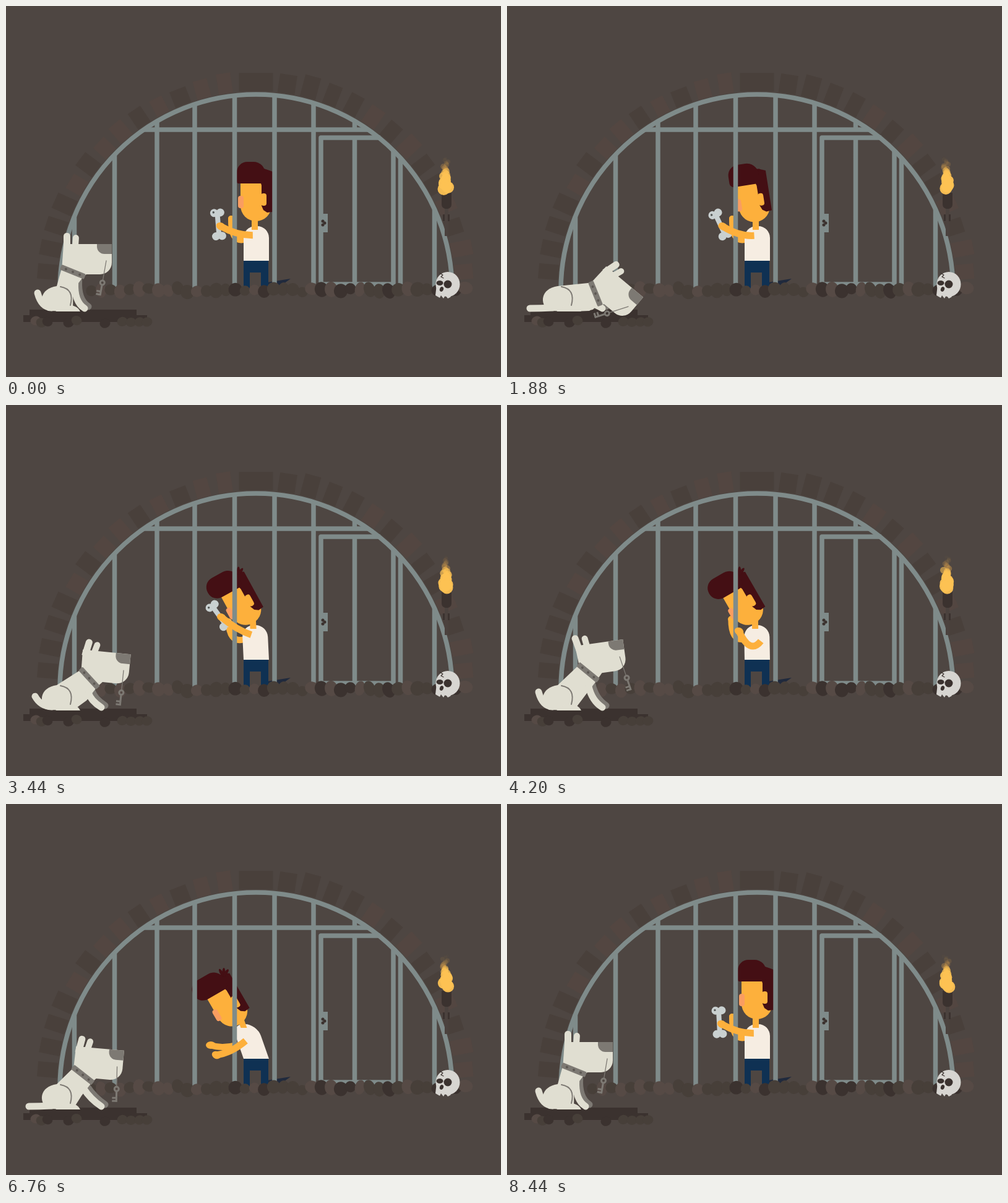
Recreate the animation shown at these times as an HTML page with a canvas. Size 800 by 600 pixels, loop 8.48 s.

```html
<!DOCTYPE html>
<html>
<head>
<meta charset="utf-8">
<title>Prisoner and guard dog</title>
<style>
html, body { margin: 0; width: 100%; height: 100%; overflow: hidden; background: #4e4642; }
canvas { display: block; }
</style>
</head>
<body>
<canvas id="stage" width="800" height="600"></canvas>
<script>
const c = document.getElementById('stage').getContext('2d');
const LOOP = 8480, RAD = Math.PI / 180, TURN = 2 * Math.PI;
const BG = '#4e4642', STEEL = '#7f8b8a', DARK = '#3b322f', MID = '#473f39', LIGHT = '#564a45';
const SKIN = '#fdb03c', HAIR = '#440f14', SHIRT = '#f6ede2', NAVY = '#0f3153';
const FUR = '#e0ded1', GREY = '#7d7973', BONE = '#c9d0d0';

// ---- drawing helpers ----
function shape(color, build) {
  c.fillStyle = color;
  c.beginPath();
  build();
  c.fill();
}
function line(color, width, build, cap = 'round') {
  c.strokeStyle = color;
  c.lineWidth = width;
  c.lineCap = cap;
  c.lineJoin = 'round';
  c.beginPath();
  build();
  c.stroke();
}
const rect = (color, x, y, w, h) => { c.fillStyle = color; c.fillRect(x, y, w, h); };
const round = (color, x, y, w, h, r) => shape(color, () => c.roundRect(x, y, w, h, r));
const oval = (color, x, y, rx, ry = rx, deg = 0) =>
  shape(color, () => c.ellipse(x, y, rx, ry, deg * RAD, 0, TURN));
const trace = (...pts) => pts.forEach(([x, y], i) => i ? c.lineTo(x, y) : c.moveTo(x, y));
const poly = (color, ...pts) => shape(color, () => trace(...pts));
function bend(color, width, a, b, d, cap) {
  line(color, width, () => { c.moveTo(...a); c.quadraticCurveTo(...b, ...d); }, cap);
}
function at(x, y, deg, draw) {
  c.save();
  c.translate(x, y);
  c.rotate(deg * RAD);
  draw();
  c.restore();
}

// ---- timing and number helpers ----
const clamp = (v, lo = 0, hi = 1) => Math.max(lo, Math.min(hi, v));
const mix = (a, b, k) => a + (b - a) * k;
function ramp(t, a, b) {
  const k = clamp((t - a) / (b - a));
  return k * k * (3 - 2 * k);
}
function poseAt(keys, t) {
  const i = keys.findLastIndex(([time]) => time <= t);
  const [t0, a] = keys[i], [t1, b] = keys[i + 1], k = ramp(t, t0, t1);
  return Object.fromEntries(Object.keys(a).map(name => [name, mix(a[name], b[name], k)]));
}
function noise(n) {
  const v = Math.sin(n * 127.1 + 31.7) * 43758.5453;
  return v - Math.floor(v);
}

// ---- scenery ----
const ARCH = { x: 404, y: 460, r: 317 };

function bricks() {
  for (let i = -13; i <= 13; i++) {
    const w = i ? 22 + 6 * noise(i) : 55, h = 27 + 10 * noise(i + 50);
    const angle = i * 6.35 + Math.sign(i) * 2.3;
    const color = i && noise(i + 90) < .35 ? '#534641' : '#49403b';
    at(ARCH.x, ARCH.y, angle, () => rect(color, -w / 2, -322 - h, w, h));
  }
}
function rock(x, y, rx, ry, seed) {
  const color = [MID, MID, LIGHT, DARK][Math.floor(noise(seed) * 4)];
  oval(color, x, y, rx, ry, (noise(seed + 1) - .5) * 50);
}
function rocks() {
  for (let x = 138, i = 0; x < 755; x += 15.5, i += 5)
    rock(x, 456 + 7 * noise(i + 2), 8 + 4 * noise(i + 3), 8 + 5 * noise(i + 4), i);
}
function platform() {
  rect(DARK, 38, 491, 173, 11);
  rect(DARK, 28, 500, 200, 11);
  [48, 57, 67, 101, 114, 160, 188, 202, 216, 228].forEach((x, i) =>
    rock(x, 508 + 7 * noise(i + 4), 8.5, 7.5, i + 300));
}
function bars() {
  const topOf = x => ARCH.y - Math.sqrt(ARCH.r ** 2 - (x - ARCH.x) ** 2);
  line(STEEL, 7.5, () => {
    [110.5, 175.5, 244, 305, 369.5, 434, 497, 626, 637.5, 692.5].forEach(x =>
      trace([x, topOf(x)], [x, 457]));
    trace([222, 200], [586, 200]);
    trace([563.5, topOf(563.5)], [563.5, 200]);
    trace([563.5, 213], [563.5, 450]);
    trace([605, 213], [509, 213], [509, 450], [628, 450]);
  }, 'butt');
  line(STEEL, 7.5, () => c.arc(ARCH.x, ARCH.y, ARCH.r, Math.PI, 0), 'butt');
  rect(STEEL, 511, 336, 9, 30);
  oval(DARK, 512, 348, 2.5);
  oval(DARK, 512, 354, 2.5);
  oval(DARK, 515, 351, 2.5);
}
function torch(t) {
  rect('#4b423e', 709, 326, 6, 46);
  rect(DARK, 706, 337, 3, 11);
  rect(DARK, 714, 337, 3, 11);
  round(DARK, 704, 302, 16, 26, [1, 1, 7, 7]);
  const count = 20, life = 848;
  for (let i = count - 1; i >= 0; i--) {
    const p = t / life + i / count, age = p % 1, id = i + 37 * (Math.floor(p) % 10);
    const x = 710.5 + (noise(id) - .5) * 8 + Math.sin(age * 5 + id) * 2 * age;
    c.globalAlpha = age < .35 ? .95 : .95 * ((1 - age) / .65) ** 1.4;
    oval(age < .6 ? '#fdc253' : '#c8954a', x, 296 - 52 * age, 3 + 7 * (1 - age) ** 1.3);
  }
  c.globalAlpha = 1;
}
function skull() {
  const white = '#d7d5d1';
  oval(white, 714, 450, 19.5, 20);
  poly(white, [696, 450], [694, 468], [701, 472], [703, 468], [707, 473], [710, 468], [714, 473], [718, 471], [723, 464]);
  oval(DARK, 701, 448, 5.5, 4);
  oval(DARK, 714, 450, 6.5);
  oval(DARK, 704, 458, 3, 4, 20);
  line(DARK, 1.2, () => trace([701, 432], [706, 435], [703, 438], [707, 440]));
}

// ---- prisoner ----
const HOLD = { lean: 0, tilt: 0, x: 347, y: 356, bone: -3 };
const PEER = { lean: 0, tilt: -30, x: 356, y: 348, bone: -14 };
const WIND = { lean: -2, tilt: -26, x: 376, y: 338, bone: 35 };
const THROW = { lean: 5, tilt: -30, x: 335, y: 346, bone: -70 };
const SAD = { lean: 1, tilt: -30, x: 375, y: 366, bone: 0 };
const REACH = { lean: 20, tilt: -30, x: 340, y: 406, bone: 0 };
const HIDE = { lean: 0, tilt: -8, x: 408, y: 401, bone: 30 };
const manKeys = [
  [0, HOLD], [1700, HOLD], [2200, PEER], [2800, PEER], [3280, WIND], [3540, THROW], [4050, SAD],
  [5900, SAD], [6500, REACH], [7100, REACH], [7600, HIDE], [7760, HIDE], [8200, HOLD], [LOOP, HOLD]
];
const THROWN = 3540, FETCHED = 7620, SHOWN = 7960, FLIGHT = 600;

function bone(x, y, deg) {
  at(x, y, deg, () => {
    rect(BONE, -4, -18, 8, 36);
    for (const side of [-1, 1]) {
      oval(BONE, -5, 19 * side, 6.5);
      oval(BONE, 5, 19 * side, 6.5);
    }
    oval('#535756', -6, -20, 1.7);
  });
}
const heldBone = m => bone(m.x - 4, m.y - 3, m.bone);

// The bone is shaken at the dog around the start of the loop.
function readMan(t) {
  const m = poseAt(manKeys, t), s = t > 8000 ? t - LOOP : t;
  const strength = ramp(s, -360, -60) * (1 - ramp(s, 1600, 2100));
  const wave = strength * (.5 - .5 * Math.cos((s + 40) / 733 * TURN));
  m.x -= 3 * wave;
  m.y += 8 * wave;
  m.bone -= 54 * wave;
  return m;
}
function manHead({ lean, tilt }) {
  const k = tilt / -30;
  at(402 - 1.25 * lean, 350 + 5 * k + .2 * lean, tilt, () => {
    round(SKIN, -23, -70, 50, 68, [0, 0, 25, 25]);
    poly(HAIR, [0, -94], [15, -87], [24, -84], [29, -82], [29, -17], [20, -16], [14, -20], [11, -27], [11, -60]);
    const left = -29 - 10 * k, soft = 3 + 14 * k;
    round(HAIR, left, -98, 17 - left, 35, [17, 19, 8, soft]);
    for (const a of [0, 32, 64]) at(18, -82, a, () => oval(HAIR, 0, -7 * k, 2.5, 7 * k));
    round(SKIN, 10, -47, 9, 20, 4);
    round('#fa9d60', -27, -43, 9, 20, 4);
  });
}
function manBack(m, t) {
  const k = clamp(m.lean / 20), far = [mix(364, 331, k), mix(344, 390, k)];
  bend(SKIN, 10, [384 - 12 * k, 378 + 12 * k], [mix(363, 348, k), mix(382, 396, k)], far);
  oval(SKIN, ...far, mix(5, 8, k), mix(5, 6, k));
  if (t > FETCHED && t < SHOWN) heldBone(m);
  poly('#202a3d', [422, 447], [460, 441], [442, 454], [422, 458]);
  rect(NAVY, 384, 411, 40, 20);
  rect(NAVY, 384, 430, 10, 28);
  rect(NAVY, 412, 430, 12, 28);
  c.save();
  c.transform(1, 0, m.lean / 57, 1, -412 * m.lean / 57, 0);
  round(SHIRT, 384, 356, 41, 56, [19, 19, 0, 0]);
  rect(SKIN, 397, 340, 10, 22);
  c.restore();
  manHead(m);
}
// The shoulder and elbow give way as the hand comes closer to the body.
function nearArm(m) {
  let sx = 398 - .6 * m.lean, sy = 370 + .6 * m.lean;
  const slack = Math.max(0, 55 - Math.hypot(sx - m.x, sy - m.y));
  sx += .4 * slack;
  sy += .35 * slack;
  const elbow = [(sx + m.x) / 2, (sy + m.y) / 2 + 6 + .75 * slack];
  bend(SKIN, 11, [sx, sy], elbow, [m.x, m.y], 'butt');
  oval(SKIN, m.x, m.y, 7.5, 6, 25);
}
function manFront(m, t) {
  if (t < THROWN || t >= SHOWN) heldBone(m);
  else if (t < THROWN + FLIGHT) {
    const u = (t - THROWN) / FLIGHT;
    bone(331 - 365 * u, 343 - 410 * u + 335 * u * u, -70 - 560 * u);
  }
  nearArm(m);
}

// ---- dog ----
const SIT = { down: 0, tilt: 0, tail: 0, swing: 10 };
const LEAN = { down: .4, tilt: 17, tail: .75, swing: 0 };
const LIE = { down: 1, tilt: 40, tail: 1, swing: 72 };
const ALERT = { down: .5, tilt: -8, tail: 0, swing: -19 };
const WATCH = { down: .4, tilt: 0, tail: .75, swing: -5 };
const CALM = { down: .4, tilt: 5, tail: 1, swing: 0 };
const dogKeys = [
  [0, SIT], [700, SIT], [1080, LEAN], [1500, LIE], [3150, LIE], [3600, ALERT],
  [4500, ALERT], [5280, WATCH], [6150, CALM], [7150, CALM], [7850, SIT], [LOOP, SIT]
];
function key(x, y, swing) {
  at(x, y, swing, () => {
    line(GREY, 1.3, () => trace([0, 0], [0, 32]));
    line(GREY, 3, () => c.arc(0, 36, 3.5, 0, TURN));
    line(GREY, 3, () => trace([0, 40], [0, 57]), 'butt');
    rect(GREY, -7, 49, 7, 3);
    rect(GREY, -7, 54, 7, 3);
  });
}
function dog(t) {
  const { down, tilt, tail, swing } = poseAt(dogKeys, t);
  const nx = 108 + 43 * down - .2 * tilt, ny = 430 + 13.5 * down + .54 * tilt;
  const collar = 22 + 38 * down + .2 * tilt, paw = 127 + Math.min(27, 70 * down);
  const turn = (x, y, deg) => {
    const s = Math.sin(deg * RAD), k = Math.cos(deg * RAD);
    return [nx + x * k - y * s, ny + x * s + y * k];
  };
  const back = turn(-19, 0, collar), chest = turn(19, 0, collar);
  const hip = [chest[0] - 14, Math.min(chest[1] + 10, 486)];
  const leg = (color, dx, dy) =>
    bend(color, 11, [hip[0] + dx, hip[1] + dy], [paw - 17 + dx, 478 + dy], [paw + dx, 489 + dy]);

  leg(GREY, 6, -3);
  bend(FUR, 11, [74, 488], [57 - 3 * tail, 487 + 2 * tail], [51 - 14 * tail, 464 + 25 * tail]);
  shape(FUR, () => {
    c.moveTo(...back);
    c.lineTo(82, 453);
    c.bezierCurveTo(54, 457, 52, 482, 68, 493);
    c.lineTo(108, 494);
    c.lineTo(hip[0] - 3, Math.min(hip[1] + 12, 493));
    c.lineTo(...chest);
  });
  shape(FUR, () => {
    c.moveTo(80, 494);
    c.lineTo(95, 483);
    c.quadraticCurveTo(115, 483, 120, 494);
  });
  leg(FUR, 0, 0);
  bend(GREY, 2, [88, 454], [111, 458], [104, 484]);
  poly(FUR, turn(-15, -45, tilt), turn(4, -45, tilt), turn(22, 4, tilt), chest, back);
  at(nx, ny, tilt, () => {
    const flop = clamp(2 * tilt, -12, 16);
    round(FUR, -3, -45, 66, 49, [0, 0, 19, 0]);
    at(-9, -40, flop, () => round(FUR, -6, -23, 11, 28, [5, 5, 0, 0]));
    at(4, -42, flop + 4, () => round(FUR, -5, -18, 10, 24, [5, 5, 0, 0]));
    round(GREY, 39, -45, 24, 16, [0, 0, 0, 12]);
  });
  at(nx, ny, collar, () => {
    round(GREY, -21, -4.5, 42, 9, 2);
    for (const x of [-12, 0, 12]) oval('#5d5853', x, 0, 2);
  });
  key(...turn(54, -18, tilt), swing + 1.5 * Math.sin(9 * t / LOOP * TURN));
}

function frame(now) {
  const t = now % LOOP, man = readMan(t);
  rect(BG, 0, 0, 800, 600);
  bricks();
  manBack(man, t);
  bars();
  manFront(man, t);
  rocks();
  torch(t);
  skull();
  platform();
  dog(t);
}
const start = performance.now();
function tick() {
  frame(performance.now() - start);
  requestAnimationFrame(tick);
}
tick();
</script>
</body>
</html>
```
